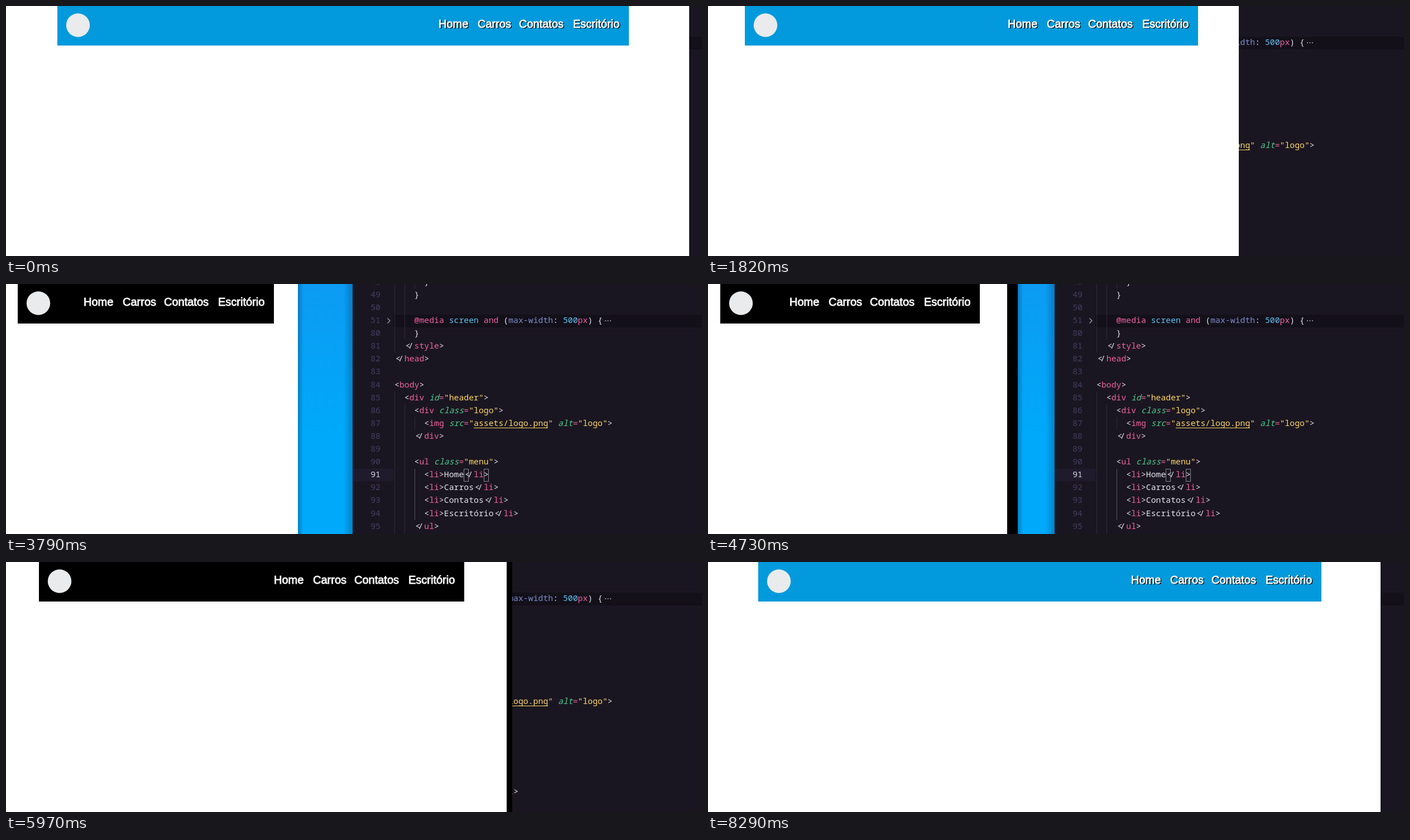
Animation, 1247 px wide and 449 px high, one loop 8440 ms. Source, as an HTML page:

```html
<!DOCTYPE html>
<html lang="pt">
<head>
<meta charset="utf-8">
<title>Responsive header</title>
<style>
  html, body { margin: 0; width: 100%; height: 100%; overflow: hidden; background: #fff; }
  svg { display: block; width: 1247px; height: 449px; }
  .code text { font: 14.8px "Noto Sans Mono", "DejaVu Sans Mono", monospace; white-space: pre; }
  .nav { font: 20px "Liberation Sans", Arial, sans-serif; stroke-width: .8; }
  .punct { fill: #e6e3ee; }
  .tag { fill: #f2609f; }
  .attr { fill: #4cc98a; font-style: italic; }
  .str { fill: #ffd866; }
  .blue { fill: #5cc4f2; }
  .prop { fill: #7d8ccb; }
  .num { fill: #453d60; }
  .current { fill: #d6cfe8; }
  .box { fill: none; stroke: #8b8794; }
</style>
</head>
<body>
<svg viewBox="0 0 1247 449">
  <defs>
    <linearGradient id="sky" x2="0" y2="1">
      <stop stop-color="#0c9bf3"/><stop offset=".6" stop-color="#00a9fa"/>
    </linearGradient>
    <linearGradient id="shade">
      <stop stop-color="#003a66" stop-opacity="0"/><stop offset="1" stop-color="#003a66" stop-opacity=".35"/>
    </linearGradient>
    <g id="links"></g>
  </defs>
  <rect width="621" height="449" fill="url(#sky)"/>
  <rect x="605" width="16" height="449" fill="url(#shade)"/>
  <g class="code" id="editor"></g>
  <rect id="edgeShade" width="10" height="449" fill="url(#shade)"/>
  <rect id="unpainted" height="449" fill="#000"/>
  <rect id="page" height="449" fill="#fff"/>
  <rect id="header" height="71"/>
  <circle id="logo" cy="34.5" r="21.2" fill="#e9ebec"/>
  <g id="nav" class="nav">
    <use href="#links" x="1.5" y="1.5" fill="#101010" stroke="#101010"/>
    <use href="#links" fill="#fff" stroke="#fff"/>
  </g>
</svg>
<script>
const $ = id => document.getElementById(id);
const set = (id, attrs) => {
  for (const name in attrs) $(id).setAttribute(name, attrs[name]);
};

// Code editor
const CHAR = 8.88, ROW = 23.1, CODE_X = 696;
const rowY = row => 65 + ROW * row;
const escapeText = s => s.replace(/&/g, '&amp;').replace(/</g, '&lt;');
const span = (cls, s) => `<tspan class="${cls}">${escapeText(s)}</tspan>`;
const rect = (x, y, w, h, fill) =>
  `<rect x="${x}" y="${y}" width="${w}" height="${h}" fill="${fill}"/>`;

const attr = (name, value) =>
  span('attr', ' ' + name) + span('tag', '=') + span('str', `"${value}"`);
const open = (name, attrs = '') =>
  span('punct', '<') + span('tag', name) + attrs + span('punct', '>');
// The opening pair is drawn tight, like a ligature
const close = name =>
  '<tspan class="punct" dx="2">&lt;</tspan><tspan class="punct" dx="-4">/</tspan>' +
  `<tspan class="tag" dx="2">${name}</tspan>` + span('punct', '>');
const item = label => open('li') + span('punct', label) + close('li');
const brace = span('punct', '}');
const media = span('tag', '@media') + span('blue', ' screen') + span('tag', ' and') +
  span('punct', ' (') + span('prop', 'max-width') + span('punct', ': ') +
  span('blue', '500') + span('tag', 'px') + span('punct', ') {');

const menu = ['Home', 'Carros', 'Contatos', 'Escritório'];
const lines = [
  [48, 6, brace], [49, 4, brace], [50, 0, ''], [51, 4, media], [80, 4, brace],
  [81, 2, close('style')], [82, 0, close('head')], [83, 0, ''],
  [84, 0, open('body')],
  [85, 2, open('div', attr('id', 'header'))],
  [86, 4, open('div', attr('class', 'logo'))],
  [87, 6, open('img', attr('src', 'assets/logo.png') + attr('alt', 'logo'))],
  [88, 4, close('div')], [89, 0, ''],
  [90, 4, open('ul', attr('class', 'menu'))],
  ...menu.map((label, i) => [91 + i, 6, item(label)]),
  [95, 4, close('ul')]
];

const guide = (x, top, bottom, fill = '#2d2937') => rect(x, top, 1, bottom - top, fill);
const bracketBox = x => `<rect class="box" x="${x}" y="332.5" width="8" height="22"/>`;

$('editor').innerHTML =
  rect(621, 0, 626, 449, '#1a1621') +
  rect(694, 55, 553, 23, '#13101a') +
  rect(621, 332, 73, 22, '#1f1a2c') +
  guide(696, 0, 123) + guide(696, 193, 449) +
  guide(714, 0, 100) + guide(714, 216, 449) +
  guide(732, 0, 8) + guide(732, 239, 262) + guide(732, 332, 424, '#56505f') +
  lines.map(([number, indent, body], i) => {
    const y = rowY(i - 3) + 5;
    return `<text x="671" y="${y}" text-anchor="end" class="${number === 91 ? 'current' : 'num'}">${number}</text>` +
      `<text x="${CODE_X + indent * CHAR}" y="${y}">${body}</text>`;
  }).join('') +
  rect(838, 258, 133, 1, '#ffd866') +
  bracketBox(820.5) + bracketBox(856.5) +
  '<path d="M683.5 61.5l4.5 4.5-4.5 4.5" fill="none" stroke="#aaa5b5" stroke-width="1.2"/>' +
  [1073, 1077.5, 1082].map(x => rect(x, 65, 2, 2, '#8a8593')).join('');

// Navigation links, measured back from the header's right edge
const linkX = [-341, -271, -197, -100];
$('links').innerHTML = menu.map((label, i) =>
  `<text x="${linkX[i]}" y="38.5">${label}</text>`).join('');

// time, layout width, painted edge, window edge
const LOOP = 8440, STEP = 78;
const keys = [
  [722, 1224, 1224, 1224],
  [1580, 1018, 1028, 1028],
  [1814, 959, 951, 951],
  [2516, 750, 762, 762],
  [2828, 695, 677, 677],
  [3374, 574, 580, 580],
  [3998, 484, 488, 488],
  [4322, 484, 488, 488],
  [4712, 525, 536, 555],
  [5180, 648, 655, 669],
  [5960, 896, 897, 907],
  [6038, 924, 930, 944],
  [6896, 1094, 1094, 1094],
  [7052, 1120, 1121, 1121],
  [7442, 1205, 1205, 1205]
];

function stateAt(time) {
  const start = time < 4400 ? 800 : 4400;
  const t = start + Math.floor((time - start) / STEP) * STEP;
  if (time < 800) return keys[0].slice(1);
  const next = keys.findIndex(key => key[0] > t);
  if (next < 0) return keys[keys.length - 1].slice(1);
  const a = keys[next - 1], b = keys[next];
  const p = (t - a[0]) / (b[0] - a[0]);
  return [1, 2, 3].map(i => Math.round(a[i] + (b[i] - a[i]) * p));
}

function render(time) {
  const [layout, painted, windowEdge] = stateAt(time);
  const left = Math.round(layout * .1 - 30.4);
  const width = Math.round(layout * .8 + 45);
  set('page', { width: painted });
  set('unpainted', { x: painted, width: windowEdge - painted });
  set('edgeShade', {
    transform: `translate(${windowEdge + 10}) scale(-1 1)`,
    visibility: windowEdge < 611 ? 'visible' : 'hidden'
  });
  set('header', { x: left, width, fill: layout < 925 ? '#000' : '#029adc' });
  set('logo', { cx: left + 37 });
  set('nav', { transform: `translate(${left + width})` });
}

const begin = performance.now();
function tick() {
  render((performance.now() - begin) % LOOP);
  requestAnimationFrame(tick);
}
tick();
</script>
</body>
</html>
```
